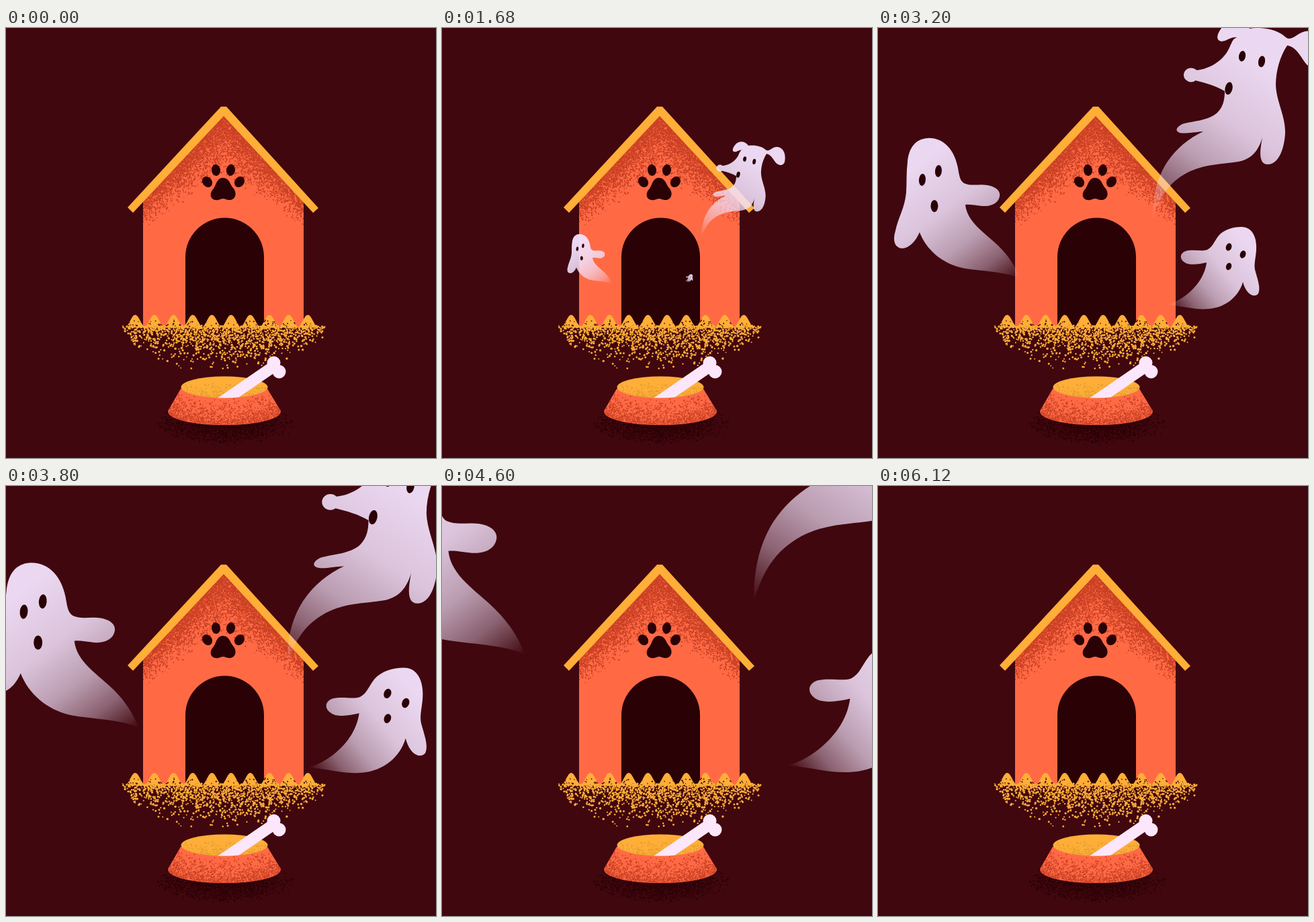
An HTML page with a canvas that plays this animation: 640 by 640 pixels, repeating every 6240 ms.

```html
<!DOCTYPE html>
<html lang="en">
<head>
<meta charset="utf-8">
<title>Dog house ghosts</title>
<style>
  html, body { margin: 0; width: 100%; height: 100%; overflow: hidden; background: #40070e; }
  canvas { display: block; width: 100vw; height: 100vh; }
</style>
</head>
<body>
<canvas id="stage" width="640" height="640"></canvas>
<script>
const LOOP = 6240;
const BG = '#40070e', DARK = '#2a0206', ORANGE = '#ff6a45', RUST = '#c83f23', YELLOW = '#ffae38', BONE = '#fbe6fb';
const ctx = document.getElementById('stage').getContext('2d');
const scene = document.createElement('canvas');
scene.width = scene.height = 640;

let seed = 7;
function rnd() {
  seed = (seed + 0x6d2b79f5) | 0;
  let t = Math.imul(seed ^ (seed >>> 15), 1 | seed);
  t = (t + Math.imul(t ^ (t >>> 7), 61 | t)) ^ t;
  return ((t ^ (t >>> 14)) >>> 0) / 4294967296;
}

function fill(g, path, color) {
  g.fillStyle = color;
  g.fill(typeof path === 'string' ? new Path2D(path) : path);
}

function oval(g, x, y, rx, ry, deg, color) {
  g.fillStyle = color;
  g.beginPath();
  g.ellipse(x, y, rx, ry, deg * Math.PI / 180, 0, 7);
  g.fill();
}

// Scatter dots over a box; chance(x, y) is the local density.
function stipple(g, [x0, y0, x1, y1], step, size, color, chance) {
  g.fillStyle = color;
  for (let y = y0; y < y1; y += step)
    for (let x = x0; x < x1; x += step) {
      if (rnd() >= chance(x, y)) continue;
      const r = size * (0.7 + 0.6 * rnd()) / 2;
      g.beginPath();
      g.arc(x + step * rnd(), y + step * rnd(), r, 0, 7);
      g.fill();
    }
}

function clipped(g, path, draw) {
  g.save();
  g.clip(path);
  draw();
  g.restore();
}

function drawHouse(g) {
  const wall = new Path2D('M204 252L324 126L443 252V446H204Z');
  fill(g, wall, ORANGE);
  clipped(g, wall, () => stipple(g, [204, 126, 443, 300], 1.3, 1.9, RUST, (x, y) => {
    const off = Math.abs(x - 324);
    const d = (y - 130 - off * 1.06) / (98 - off * 0.46);
    return Math.pow(Math.max(0, 1 - Math.max(0, d)), 1.6);
  }));
  fill(g, 'M320 117H328L465 268L457 275L324 131L189 275L181 267Z', YELLOW);
  fill(g, 'M267 446V341A58.5 58.5 0 0 1 384 341V446Z', DARK);
  for (const side of [-1, 1]) {
    oval(g, 323.5 + side * 24, 229, 7, 8.5, side * 38, DARK);
    oval(g, 323.5 + side * 11, 211.5, 6.5, 8.5, side * 8, DARK);
  }
  fill(g, 'M323 223C332 223 333 232 338 238C345 246 341 256 333 256C328 256 326 254 323 254' +
    'C320 254 317 257 312 256C304 255 302 246 309 239C313 233 314 223 323 223Z', DARK);
}

function drawGrass(g) {
  const pitch = 28.55;
  let d = 'M178 446';
  for (let i = 0; i < 10; i++) {
    const x = 178 + i * pitch;
    d += `C${x + 7} 439 ${x + 9} 427 ${x + pitch / 2} 427S${x + 22} 439 ${x + pitch} 446`;
  }
  const blades = new Path2D(d + 'Z');
  fill(g, blades, YELLOW);
  clipped(g, blades, () => stipple(g, [176, 430, 466, 447], 2.2, 2, BG,
    (x, y) => Math.max(0, (y - 433) / 40 + Math.abs(x - 322) / 1200)));
  stipple(g, [172, 443, 474, 514], 2.2, 2.7, YELLOW, (x, y) => {
    const u = (x - 323) / 152;
    const depth = 72 * Math.sqrt(Math.max(0.01, 1 - u * u));
    return 0.82 * Math.pow(Math.max(0, 1 - (y - 441) / depth), 1.5);
  });
}

function drawBowl(g) {
  stipple(g, [215, 560, 435, 625], 1.6, 1.9, DARK, (x, y) => {
    const d = Math.hypot((x - 325) / 108, (y - 588) / 32);
    return Math.max(0, 1.3 * (1 - d));
  });
  const side = new Path2D('M260 537L241 570C241 584 285 591 325 591S409 584 409 570L389 537Z');
  fill(g, side, ORANGE);
  clipped(g, side, () => stipple(g, [240, 540, 410, 592], 1.5, 1.8, RUST, (x, y) => {
    const edge = 591 - 16 * Math.pow((x - 325) / 84, 2);
    return 0.75 * Math.pow(Math.max(0, 1 - (edge - y) / 42), 1.2);
  }));
  const rim = new Path2D();
  rim.ellipse(325, 534.5, 64.5, 16, 0, 0, 7);
  fill(g, rim, YELLOW);
  clipped(g, rim, () => stipple(g, [260, 518, 390, 552], 1.5, 1.6, '#dc9a30',
    (x, y) => Math.max(0, (y - 527) / 38)));
  const open = new Path2D('M260 480H430V534H260Z');
  open.addPath(rim);
  clipped(g, open, () => {
    g.strokeStyle = BONE;
    g.lineWidth = 17;
    g.beginPath();
    g.moveTo(315, 561);
    g.lineTo(398, 504);
    g.stroke();
    oval(g, 398.5, 498.5, 10, 10, 0, BONE);
    oval(g, 406.5, 511.5, 10, 10, 0, BONE);
  });
}

// Shapes are drawn at full size; tail is the pivot; keys are [time, x, y, scale].
const ghosts = [
  {
    tail: [409, 285],
    fade: [565, 50],
    body: 'M472 63C490 62 508 52 518 38C526 27 526 16 534 14C524 13 519 20 511 20C502 19 504 8 513 -2' +
      'C522 -14 543 -15 553 1C572 -2 594 2 607 14C617 22 627 2 643 5C663 8 668 30 665 48' +
      'C662 64 645 64 636 52C628 41 622 28 609 26C598 42 592 65 592 85C593 110 606 130 606 155' +
      'C605 180 596 203 580 203C566 203 568 183 572 163C566 183 556 195 536 199C512 203 490 202 465 213' +
      'C435 227 419 250 409 285C409 250 415 224 430 200C445 178 463 164 484 154C470 155 456 158 449 156' +
      'C442 154 443 148 453 143C470 138 492 138 505 126C514 117 516 106 516 94C503 86 488 82 472 78Z' +
      'M455 70A11 10.5 0 1 1 477 70A11 10.5 0 1 1 455 70Z',
    holes: [[542, 42, 5, 8, 10], [571, 50, 5, 8.5, 10], [522, 90, 5.5, 9.5, 12]],
    keys: [[620, 345, 350, 0], [1680, 386, 313, .485], [2400, 399, 299, .715], [3200, 409, 285, 1],
      [3800, 418, 268, 1.135], [4600, 464, 172, 1.4], [5840, 560, -40, 1.75]]
  },
  {
    tail: [211, 373],
    fade: [75, 190],
    body: 'M44 200C46 178 56 165 74 164C98 163 114 182 119 208C121 220 122 227 128 231' +
      'C139 236 150 232 163 234C176 236 183 243 181 251C179 261 168 266 155 265C145 264 136 262 130 263' +
      'C133 290 160 305 180 325C195 340 206 357 211 373C190 362 150 362 125 357C95 350 72 330 62 304' +
      'C56 318 46 328 36 328C24 327 22 315 26 302C30 282 40 268 42 245C43 230 42 215 44 200Z',
    holes: [[66, 226, 5, 9, 5], [90, 213, 5, 9, 5], [84, 265, 5.5, 9, 0]],
    keys: [[1080, 290, 374, 0], [1680, 253, 381, .355], [2400, 229, 385, .69], [3200, 211, 373, 1],
      [3800, 197, 360, 1.175], [4600, 123, 251, 1.4], [5840, -20, 120, 1.75]]
  },
  {
    tail: [430, 412],
    fade: [545, 315],
    body: 'M541 296C556 296 563 310 563 326C563 340 559 350 561 360C564 372 570 386 566 395' +
      'C561 402 548 398 543 378C537 399 518 416 492 418C470 420 450 413 430 412C452 406 470 390 480 374' +
      'C486 364 488 356 489 349C480 351 470 353 461 351C449 347 447 336 458 332C469 329 482 333 490 330' +
      'C498 326 500 318 507 309C515 300 528 296 541 296Z',
    holes: [[522, 326, 4.2, 5.8, 20], [543, 337, 4.2, 5.8, 20], [522, 355, 4, 5.5, 20]],
    keys: [[1530, 355, 370, 0], [1680, 361, 377, .09], [2400, 393, 398, .52], [3200, 430, 412, 1],
      [3800, 450, 419, 1.28], [4600, 514, 416, 1.58], [5840, 650, 402, 2]]
  }
];

for (const ghost of ghosts) {
  ghost.path = new Path2D(ghost.body);
  const tint = ctx.createLinearGradient(...ghost.fade, ...ghost.tail);
  [[0, .96], [.35, .87], [.6, .69], [.8, .42], [1, 0]].forEach(([at, a]) =>
    tint.addColorStop(at, `rgba(242,224,250,${a})`));
  ghost.tint = tint;
}

// Smooth curve through the keys: Hermite with finite-difference slopes.
function pose(keys, t) {
  const last = keys.length - 1;
  if (t <= keys[0][0] || t >= keys[last][0]) return null;
  const i = keys.findIndex(k => k[0] > t) - 1;
  const a = keys[i], b = keys[i + 1], span = b[0] - a[0], u = (t - a[0]) / span;
  const slope = (n, c) => {
    const p = keys[Math.max(0, n - 1)], q = keys[Math.min(last, n + 1)];
    return (q[c] - p[c]) / (q[0] - p[0]) * span;
  };
  return [1, 2, 3].map(c =>
    a[c] + (b[c] - a[c]) * u * u * (3 - 2 * u) +
    slope(i, c) * u * (1 - u) * (1 - u) - slope(i + 1, c) * u * u * (1 - u));
}

function drawGhost({ keys, tail, path, tint, holes }, t) {
  const at = pose(keys, t);
  if (!at) return;
  const [x, y, s] = at;
  ctx.save();
  ctx.translate(x, y);
  ctx.scale(s, s);
  ctx.translate(-tail[0], -tail[1]);
  fill(ctx, path, tint);
  for (const hole of holes) oval(ctx, ...hole, DARK);
  ctx.restore();
}

const g = scene.getContext('2d');
g.fillStyle = BG;
g.fillRect(0, 0, 640, 640);
drawHouse(g);
drawGrass(g);
drawBowl(g);

const start = performance.now();
function frame() {
  const t = (performance.now() - start) % LOOP;
  ctx.drawImage(scene, 0, 0);
  for (const ghost of ghosts) drawGhost(ghost, t);
  requestAnimationFrame(frame);
}
frame();
</script>
</body>
</html>
```
